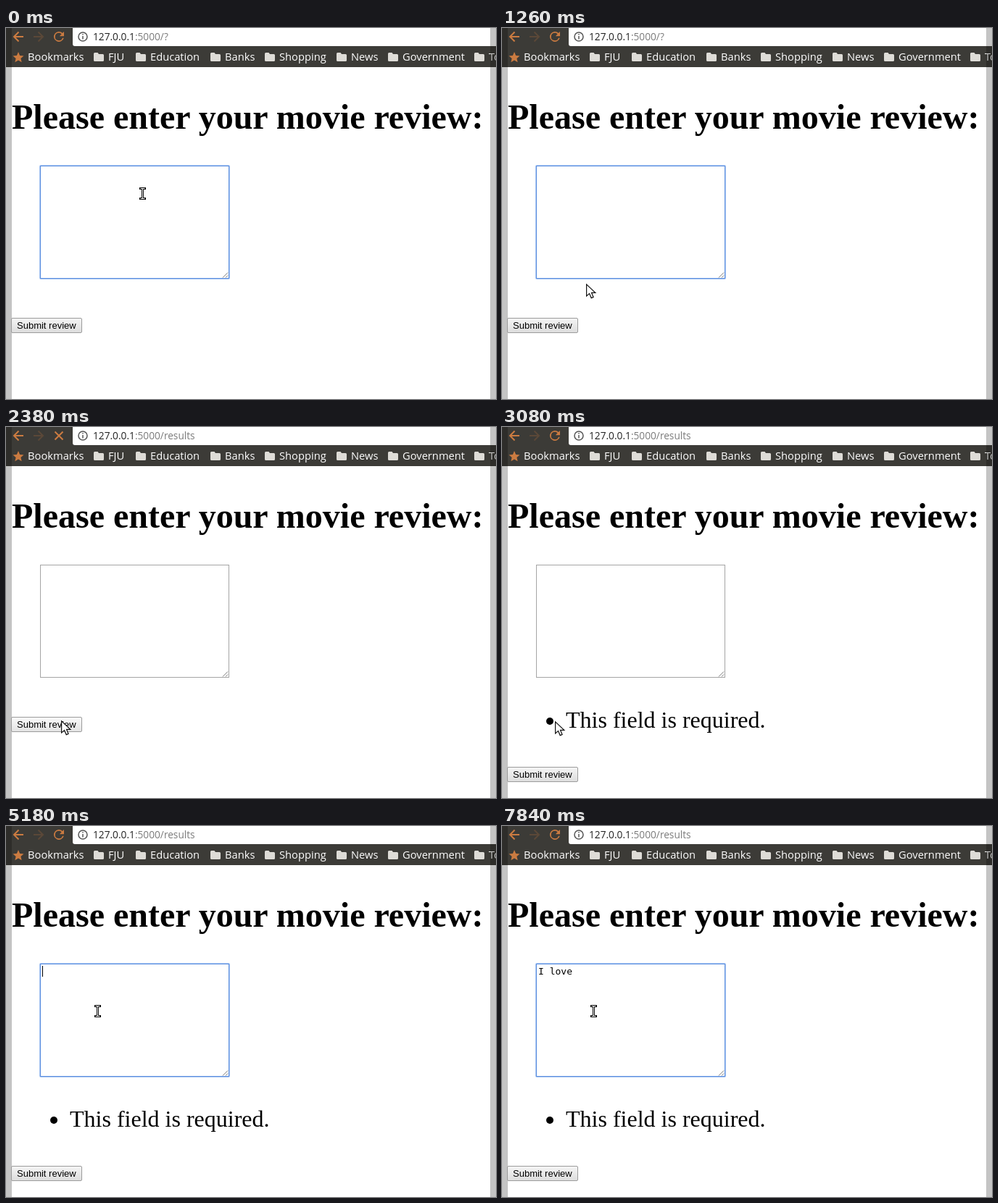
These frames come from a looping animation (676 by 512 pixels, 8000 ms). An HTML page:

```html
<!DOCTYPE html>
<html lang="en">
<head>
<meta charset="utf-8">
<title>Movie review form</title>
<style>
  html, body { margin: 0; width: 100%; height: 100%; overflow: hidden; background: #fff; }
  svg { display: block; }
  .ui { font: 14.7px "Open Sans", "Noto Sans", sans-serif; fill: #fff; }
  .url { font-size: 13.7px; fill: #7b7b7b; }
  .line { fill: none; stroke: #cb7b41; stroke-width: 2; }
  .serif { font-family: "Liberation Serif", serif; }
  .grip { fill: none; stroke: #777; }
</style>
</head>
<body>
<svg width="676" height="512" viewBox="0 0 676 512">
  <defs>
    <linearGradient id="up" x2="0" y2="1"><stop stop-color="#f5f5f5"/><stop offset="1" stop-color="#dddddd"/></linearGradient>
    <linearGradient id="over" x2="0" y2="1"><stop stop-color="#fafafa"/><stop offset="1" stop-color="#e3e3e3"/></linearGradient>
    <linearGradient id="down" x2="0" y2="1"><stop stop-color="#d4d4d4"/><stop offset="1" stop-color="#ededed"/></linearGradient>
  </defs>
  <rect width="676" height="512" fill="#fff"/>

  <!-- browser toolbar -->
  <rect width="676" height="54" fill="#3c3b37"/>
  <path d="M92 0H676V25H95Q92 25 92 22Z" fill="#fff"/>
  <path class="line" d="M24 12H11M17.5 5.5L11 12l6.500 6.500"/>
  <path class="line" d="M38 12H51M44.500 5.500L51 12l-6.500 6.500" style="stroke:#5b4838"/>
  <path id="reload" fill="#cb7b41" transform="translate(62.500 1.500) scale(.875)"
    d="M17.650 6.350A8 8 0 1 0 19.730 14h-2.080A6 6 0 1 1 12 6c1.660 0 3.140.69 4.220 1.780L13 11h7V4z"/>
  <path id="stop" class="line" d="M67.500 6.500l11 11m0-11l-11 11"/>
  <g fill="none" stroke="#555" stroke-width="1.500">
    <circle cx="106" cy="12" r="6"/>
    <path d="M106 11v4.500M106 8v1.600"/>
  </g>
  <text class="ui url" x="120" y="17"><tspan fill="#222">127.0.0.1</tspan>:5000/<tspan id="path">?</tspan></text>
  <path fill="#cb7b41" transform="translate(8 31.500) scale(.75)"
    d="M12 17.270L18.180 21l-1.640-7.030L22 9.240l-7.190-.61L12 2 9.190 8.630 2 9.240l5.460 4.730L5.820 21z"/>
  <text class="ui" x="30" y="45">Bookmarks</text>
  <g id="folders"></g>

  <!-- window edges -->
  <path d="M0 0H8V512H0ZM668 0h8V512h-8Z" opacity=".23"/>

  <!-- page -->
  <text class="serif" x="8" y="139" font-size="48" font-weight="bold">Please enter your movie review:</text>
  <rect id="ring" x="46.500" y="189.500" width="262" height="157" rx="1" fill="none" stroke="#a9c6f3"/>
  <rect id="box" x="47.500" y="190.500" width="260" height="155" fill="#fff"/>
  <path class="grip" d="M299 344.500l7-7M303 344.500l3-3"/>
  <text id="typed" x="50" y="205" font-size="13" font-family="DejaVu Sans Mono, monospace"></text>
  <rect id="caret" y="193" width="1" height="15"/>
  <g id="error">
    <circle cx="66" cy="406" r="5"/>
    <text class="serif" x="88" y="415" font-size="32">This field is required.</text>
  </g>
  <g id="button">
    <rect id="face" x="7.500" y="400.500" width="97" height="20" rx="1.500" stroke="#9c9c9c"/>
    <text x="15" y="415" font-size="13" font-family="Liberation Sans, Arial, sans-serif">Submit review</text>
  </g>

  <!-- mouse -->
  <g id="beam" fill="none" stroke-linecap="square">
    <path d="M-3-7H3M0-7V7M-3 7H3" stroke="#000" stroke-width="3"/>
    <path d="M-2.500-7H2.500M0-7V7M-2.500 7H2.500" stroke="#fff"/>
  </g>
  <path id="arrow" d="M.6.8V17l4-3.600 2.600 6.200 2.900-1.200-2.600-6.100h5.300Z" fill="#fff" stroke="#111" stroke-width="1.200"/>
</svg>
<script>
const $ = id => document.getElementById(id);
const show = (id, on) => $(id).setAttribute('visibility', on ? 'visible' : 'hidden');
const within = (t, from, to) => t >= from && t < to;

const LOOP = 8000, STEP = 70;
const PRESS = 1960, RELEASE = 2380, ANSWER = 2590, FOCUS = 3920;
const TEXT = 'I love';
const KEYS = [5250, 5810, 6230, 6440, 6790, 7210];
const MOUSE = [ // time, x, y
  [0, 188.5, 228.5], [630, 188.5, 228.5], [980, 166, 288.5], [1470, 79, 403], [1540, 76, 405],
  [2730, 76, 405], [2800, 73, 406], [3150, 73, 406], [3570, 126.5, 255.5], [LOOP, 126.5, 255.5]
];
const FOLDERS = { FJU: 121, Education: 179, Banks: 282, Shopping: 357, News: 456, Government: 527, To: 646 };

$('folders').innerHTML = Object.entries(FOLDERS).map(([name, x]) => `
  <path transform="translate(${x} 34)" fill="#dedcd7"
    d="M1.5 0h4l1.500 2h5.500q1.500 0 1.500 1.500v7q0 1.500-1.500 1.500h-11Q0 12 0 10.500v-9Q0 0 1.500 0"/>
  <text class="ui" x="${x + 20}" y="45">${name}</text>`).join('');

function mouseAt(t) {
  const i = MOUSE.findIndex(p => p[0] > t);
  const [t0, x0, y0] = MOUSE[i - 1], [t1, x1, y1] = MOUSE[i];
  const k = (t - t0) / (t1 - t0);
  return [x0 + (x1 - x0) * k, y0 + (y1 - y0) * k];
}

function draw(t) {
  const sent = t >= RELEASE, answered = t >= ANSWER;
  const focused = t < PRESS || t >= FOCUS;
  const [x, y] = mouseAt(t);

  const loading = within(t, RELEASE, 2660) || within(t, 2800, 3080);
  show('stop', loading);
  show('reload', !loading);
  $('path').textContent = sent ? 'results' : '?';

  show('ring', focused);
  $('box').setAttribute('stroke', focused ? '#5c8fdf' : '#a5a5a5');
  const count = KEYS.filter(k => t >= k).length;
  $('typed').textContent = TEXT.slice(0, count);
  $('caret').setAttribute('x', Math.floor(50.2 + 7.83 * count));
  show('caret', within(t, 140, 770) || within(t, 1400, PRESS) || within(t, FOCUS, 4550) || within(t, 5180, 7840));

  show('error', answered);
  const pressed = within(t, PRESS, RELEASE), hover = !answered && y >= 400;
  $('button').setAttribute('transform', `translate(0 ${answered ? 69 : 0})`);
  $('face').setAttribute('fill', `url(#${pressed ? 'down' : hover ? 'over' : 'up'})`);

  const overBox = y < 347;
  show('beam', overBox);
  show('arrow', !overBox);
  $(overBox ? 'beam' : 'arrow').setAttribute('transform', `translate(${Math.floor(x) + (overBox ? .5 : 0)} ${Math.floor(y) + (overBox ? .5 : 0)})`);
}

const start = performance.now();
function tick() {
  const t = (performance.now() - start) % LOOP;
  draw(Math.floor(t / STEP) * STEP);
  requestAnimationFrame(tick);
}
tick();
</script>
</body>
</html>
```
